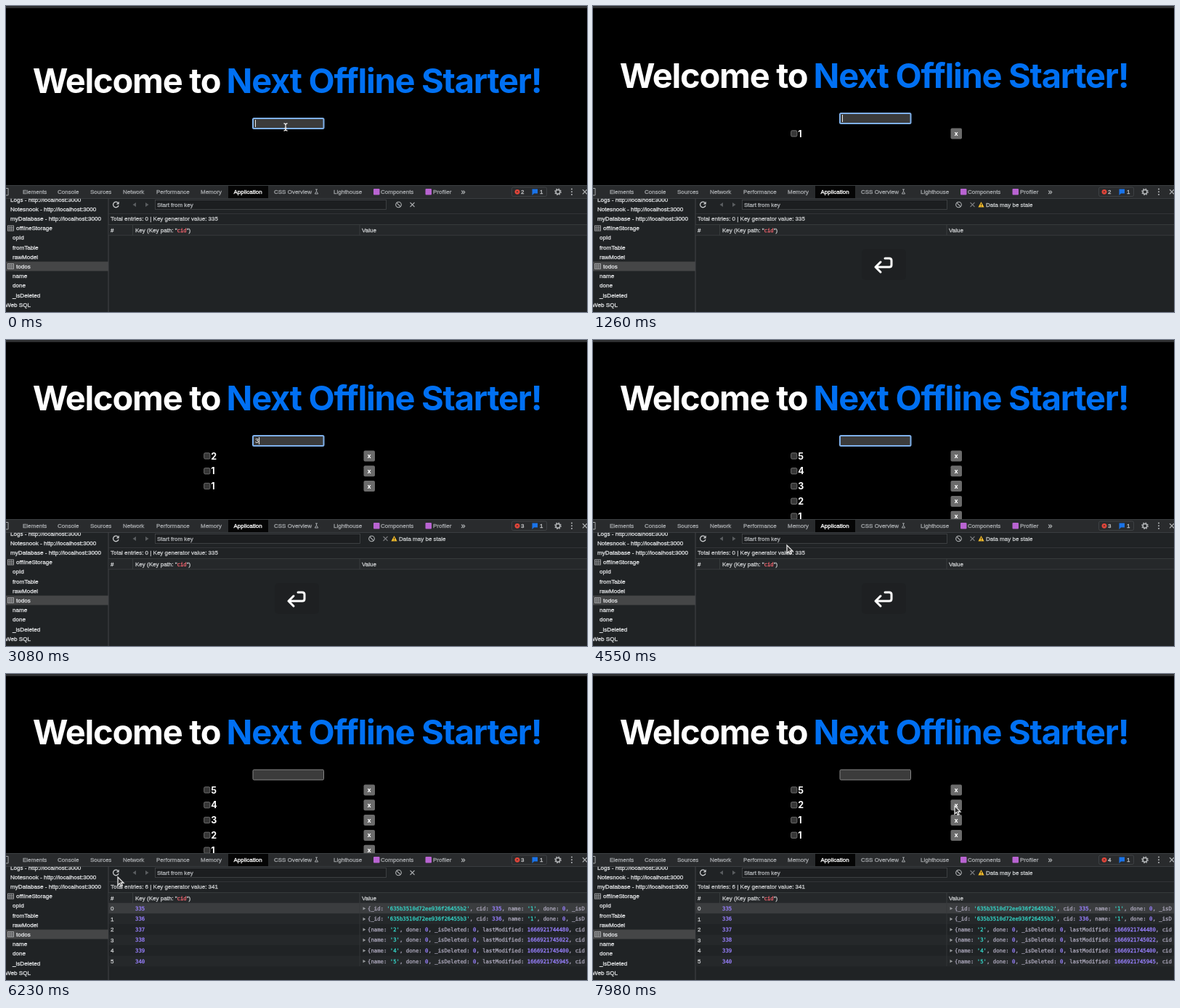
Recreate the animation shown at these times as an HTML page. Size 800x422 px, loop 8000 ms.

```html
<!DOCTYPE html>
<html lang="en">
<head>
<meta charset="utf-8">
<title>Offline todo demo</title>
<style>
  html, body { margin: 0; width: 100%; height: 100%; overflow: hidden; background: #000; }
  svg { display: block; width: 100%; height: 100%; }
  text { font: 8px "Liberation Sans", Arial, sans-serif; white-space: pre; }
  .ui text { stroke: currentColor; stroke-width: .3; }
  .title { font: bold 47px Inter, sans-serif; letter-spacing: -1.25px; text-anchor: middle; }
  .side text { font-size: 8.1px; }
  .mono { font: 7.3px "DejaVu Sans Mono", monospace; }
  .label { font: bold 12.5px Inter, sans-serif; }
  .cross { font: bold 9px Inter, sans-serif; text-anchor: middle; }
</style>
</head>
<body>
<svg id="stage" viewBox="0 0 800 422"></svg>
<script>
const LOOP = 8000;
const REFRESH = 5530;
const FIRST_DELETE = 7250, SECOND_DELETE = 7600;
// Each entry: what is typed, when its key goes down, when Enter follows.
const entries = [
  ['1', 640, 800], ['1', 1380, 1540], ['2', 2310, 2550],
  ['3', 2940, 3092], ['4', 3330, 3470], ['5', 3870, 4015],
];
const INPUT_Y = [162, 155, 144.5, 139];
const pointerPath = [
  [4340, 385, 163], [4550, 267, 283], [4900, 153, 277],
  [5700, 152, 276], [6230, 154, 280], [6400, 154, 280], [7000, 498, 182], [8000, 498, 182],
];

const text = (x, y, content, fill = '#a3a6a9', extra = '') =>
  `<text x="${x}" y="${y}" fill="${fill}" color="${fill}" ${extra}>${content}</text>`;
const rect = (x, y, w, h, fill, extra = '') =>
  `<rect x="${x}" y="${y}" width="${w}" height="${h}" fill="${fill}" ${extra}/>`;
const line = (d, stroke, width = 1, extra = '') =>
  `<path d="${d}" fill="none" stroke="${stroke}" stroke-width="${width}" ${extra}/>`;
const group = (id, content, extra = '') => `<g id="${id}" ${extra}>${content}</g>`;

function page() {
  const title = text(166, -42.5, 'Welcome to', '#fff', 'class="title"') +
    text(520.5, -42.5, 'Next Offline Starter!', '#0070f3', 'class="title"');
  const input = rect(340, -7, 97.5, 14, '#3b3b3b', 'id="box" rx="1.5"') +
    text(343, 3.2, '', '#fff', 'id="typed" style="font-size:9px"') +
    rect(343, -5, .9, 10, '#fff', 'id="caret"');
  const rows = entries.map(([label]) => `<g class="todo">` +
    rect(272.7, -4.2, 8.2, 8.2, '#363636', 'rx="1.5" stroke="#757575" stroke-width=".9"') +
    text(282.3, 4.6, label, '#fff', 'class="label"') +
    rect(492.5, -7.5, 15.5, 15, '#6b6b6b', 'rx="2"') +
    text(500.2, 3, 'x', '#fff', 'class="cross"') + '</g>').join('');
  return group('page', title + input + rows);
}

function tabBar() {
  const tabs = [[23, 'Elements'], [71, 'Console'], [116, 'Sources'], [161, 'Network'],
    [207, 'Performance'], [268, 'Memory'], [369, 'CSS Overview'], [451, 'Lighthouse'],
    [516, 'Components'], [588, 'Profiler']];
  return rect(0, 247, 800, 18, '#292b2d') + line('M0 247.5H800M0 265.5H800', '#414447', .8) +
    rect(306, 248, 55, 17, '#050505') +
    tabs.map(([x, name]) => text(x, 259.3, name)).join('') +
    text(313.5, 259.3, 'Application', '#fff') +
    line('M426 253H429M427.5 253V255.5L425.3 259H429.7L427.5 255.5', '#a3a6a9') +
    rect(506, 252, 8.5, 8.5, '#b964d2', 'rx="1"') + rect(577.5, 252, 8.5, 8.5, '#b964d2', 'rx="1"') +
    text(626.5, 259.5, '»', '#b3b6b8', 'style="font-size:11px"') +
    line('M-4 251.5H3V261H-4', '#a3a6a9') +
    rect(696.5, 250, 48, 12.5, 'none', 'rx="2" stroke="#45484b" stroke-width=".8"') +
    '<circle cx="704" cy="256.3" r="3.4" fill="#e8463a"/>' +
    line('M702.8 255.1L705.2 257.5M705.2 255.1L702.8 257.5', '#292b2d', .8) +
    text(709, 259.3, '2', '#c6c8ca', 'id="errors"') +
    '<path d="M724.5 252.5H732V258.5H727L724.5 261Z" fill="#1a73e8"/>' +
    text(735, 259.3, '1', '#c6c8ca') +
    '<circle cx="760" cy="256.3" r="2.9" fill="none" stroke="#b3b6b8" stroke-width="1.5"/>' +
    '<circle cx="760" cy="256.3" r="4.2" fill="none" stroke="#b3b6b8" stroke-width="1.2" stroke-dasharray="1.7 1.6"/>' +
    [252.6, 256.3, 260].map(y => `<circle cx="779" cy="${y}" r="1" fill="#b3b6b8"/>`).join('') +
    line('M794 253.2L800 259.4M800 253.2L794 259.4', '#b3b6b8', 1.2);
}

function sidebar() {
  const host = ' - http://localhost:3000';
  const names = [[6, 'Logs' + host], [6, 'Notesnook' + host], [6, 'myDatabase' + host],
    [14, 'offlineStorage'], [9, 'opId'], [9, 'fromTable'], [9, 'rawModel'], [14, 'todos'],
    [9, 'name'], [9, 'done'], [9, '_isDeleted'], [-1, 'Web SQL']];
  const grid = y => rect(2.5, y - 3.5, 8, 7, 'none', 'stroke="#a9abad" stroke-width=".9"') +
    line(`M2.5 ${y - 1}H10.5M2.5 ${y + 1.2}H10.5M5.2 ${y - 3.5}V${y + 3.5}M7.8 ${y - 3.5}V${y + 3.5}`, '#a9abad', .7);
  return '<clipPath id="below"><path d="M0 265H141V422H0Z"/></clipPath>' +
    '<g class="side" clip-path="url(#below)">' + rect(0, 352.5, 141, 13, '#454647') +
    names.map(([x, name], i) => text(x, 269.7 + i * 13.18, name, '#dcdee0')).join('') +
    grid(306.5) + grid(359) + '</g>' + line('M141 265V422', '#424548');
}

function toolbar() {
  const buttons = (x, stroke) =>
    `<circle cx="${x}" cy="274" r="3.8" fill="none" stroke="#b3b6b8" stroke-width="1.1"/>` +
    line(`M${x - 2.6} 271.4L${x + 2.6} 276.6`, '#b3b6b8', 1.1) +
    line(`M${x + 16} 271L${x + 22} 277M${x + 22} 271L${x + 16} 277`, stroke, 1.1);
  const field = w => rect(205.5, 267.5, w, 13, '#1c1e20', 'stroke="#45484a" stroke-width=".8"');
  return line('M154 271.2A3.8 3.8 0 1 0 155 275', '#c9cbcd', 1.3) +
    '<path d="M155.7 269.5V273.5H151.7Z" fill="#c9cbcd"/>' +
    '<path d="M179 271V277L174.5 274ZM192 271V277L196.5 274Z" fill="#5a5d60"/>' +
    group('fresh', field(318) + buttons(540.5, '#a6a9ab')) +
    group('stale', field(282) + buttons(503.5, '#77797c') +
      '<path d="M534.5 270L538.6 277.5H530.4Z" fill="#f5bd2c"/>' +
      line('M534.5 272.5V275M534.5 275.8V276.6', '#29200a', .9) +
      text(541, 276.8, 'Data may be stale', '#c2c5c7')) +
    text(208, 276.8, 'Start from key', '#aeb1b4') +
    line('M141 286.5H800', '#36393b', .8);
}

function table() {
  const paint = code => code
    .replace(/'[^']*'|\b\d+(?=,)/g, s => {
      const color = s[0] === "'" ? '#35d4c7' : '#9980ff';
      return `<tspan fill="${color}" stroke="${color}">${s}</tspan>`;
    });
  const stamps = [4480, 5022, 5400, 5945];
  const values = ['2', '3'].map((end, i) =>
    `{_id: '635b3510d72ee936f26455b${end}', cid: ${335 + i}, name: '1', done: 0, _isD`)
    .concat(stamps.map((ms, i) =>
      `{name: '${i + 2}', done: 0, _isDeleted: 0, lastModified: 166692174${ms}, cid`));
  const rows = values.map((value, i) => {
    const y = 323.2 + i * 14.55;
    return rect(141.5, y - 7.2, 658.5, 14.5, i ? (i % 2 ? '#25282a' : '#202325') : '#3b3d3f') +
      text(144, y + 2.8, i, '#c6c8ca') +
      text(178, y + 2.6, 335 + i, '#9980ff', 'class="mono"') +
      `<path d="M491.5 ${y - 2}V${y + 2.4}L495.3 ${y + .2}Z" fill="#989b9e"/>` +
      text(498, y + 2.6, paint(value), '#a6a2b5', 'class="mono"');
  }).join('');
  return text(144, 296, '', '#c6c8ca', 'id="total"') +
    rect(141.5, 301.5, 658.5, 14.5, '#25282a') +
    line('M141 301.5H800M141 316.2H800M174.5 302V316M487 302V316', '#3d4042', .8) +
    text(144, 312, '#', '#d5d7d9') +
    text(178, 312, 'Key (Key path: "<tspan class="mono" fill="#f0646e" stroke="#f0646e">cid</tspan>")', '#c9cbcd') +
    text(490, 312, 'Value', '#c9cbcd') +
    group('rows', rows + line('M487 316V403', '#35383a', .8));
}

function overlays() {
  const beam = 'M382.5 162Q385 162 385 164V170Q385 172 382.5 172M387.5 162Q385 162 385 164V170Q385 172 387.5 172M383.5 168.5H386.5';
  return group('enter', rect(370, 335, 61, 43, '#000', 'rx="5" opacity=".08"') +
      line('M402 348H408Q411 348 411 351V357Q411 360 408 360H389M396 353L389 360L396 367',
        '#fff', 3, 'stroke-linecap="round" stroke-linejoin="round"')) +
    group('beam', line(beam, '#e8e8e8', 1.3)) +
    group('pointer', '<path d="M0 0V11L2.6 8.7L4.3 12.4L6.2 11.5L4.5 8H8Z" fill="#333" stroke="#e6e6e6" stroke-width="1.3"/>');
}

const stage = document.getElementById('stage');
stage.innerHTML = rect(0, 0, 800, 422, '#000') + page() + rect(0, 0, 800, 3, '#2d2e30') +
  '<g class="ui">' + rect(0, 247, 800, 175, '#202325') + sidebar() + tabBar() + toolbar() + table() + '</g>' +
  overlays();

const el = id => document.getElementById(id);
const show = (node, on) => node.setAttribute('display', on ? 'inline' : 'none');
const place = (node, x, y) => node.setAttribute('transform', `translate(${x} ${y})`);
const todoNodes = [...document.querySelectorAll('.todo')];

function pointerAt(t) {
  const i = Math.max(1, pointerPath.findIndex(p => p[0] > t));
  const [t0, x0, y0] = pointerPath[i - 1], [t1, x1, y1] = pointerPath[i];
  const u = Math.min(1, Math.max(0, (t - t0) / (t1 - t0)));
  const ease = u * u * (3 - 2 * u);
  return [x0 + (x1 - x0) * ease, y0 + (y1 - y0) * ease];
}

function draw(t) {
  const added = entries.filter(e => t >= e[2]).length;
  const inputY = INPUT_Y[Math.min(added, 3)];
  place(el('page'), 0, inputY);

  const deleted = label => label === '4' && t >= FIRST_DELETE || label === '3' && t >= SECOND_DELETE;
  let slot = 0;
  for (let i = entries.length - 1; i >= 0; i--) {
    const visible = i < added && !deleted(entries[i][0]);
    show(todoNodes[i], visible);
    if (visible) place(todoNodes[i], 0, 21 + 20.8 * slot++);
  }

  const current = entries.find(e => t >= e[1] && t < e[2]);
  const focused = t < REFRESH;
  const lastKey = Math.max(0, ...entries.flatMap(e => [e[1], e[2]]).filter(k => k <= t));
  el('typed').textContent = current ? current[0] : '';
  el('caret').setAttribute('x', current ? 348.2 : 343);
  show(el('caret'), focused && (t - lastKey) % 1060 < 530);
  el('box').setAttribute('stroke', focused ? '#7fb0ea' : '#858585');
  el('box').setAttribute('stroke-width', focused ? 2 : 1);

  const stale = added > 0 && t < REFRESH || t >= FIRST_DELETE;
  const loaded = t >= REFRESH;
  show(el('stale'), stale);
  show(el('fresh'), !stale);
  show(el('rows'), loaded);
  el('total').textContent = `Total entries: ${loaded ? 6 : 0} | Key generator value: ${loaded ? 341 : 335}`;
  el('errors').textContent = t >= SECOND_DELETE ? 4 : added >= 3 ? 3 : 2;

  show(el('enter'), added > 0 && t < 5400);
  el('enter').setAttribute('opacity', Math.min(1, Math.max(0, (5400 - t) / 400)));
  show(el('beam'), t < entries[0][1]);
  show(el('pointer'), t >= pointerPath[0][0]);
  place(el('pointer'), ...pointerAt(t));
}

function tick() {
  draw(performance.now() % LOOP);
  requestAnimationFrame(tick);
}
tick();
</script>
</body>
</html>
```
